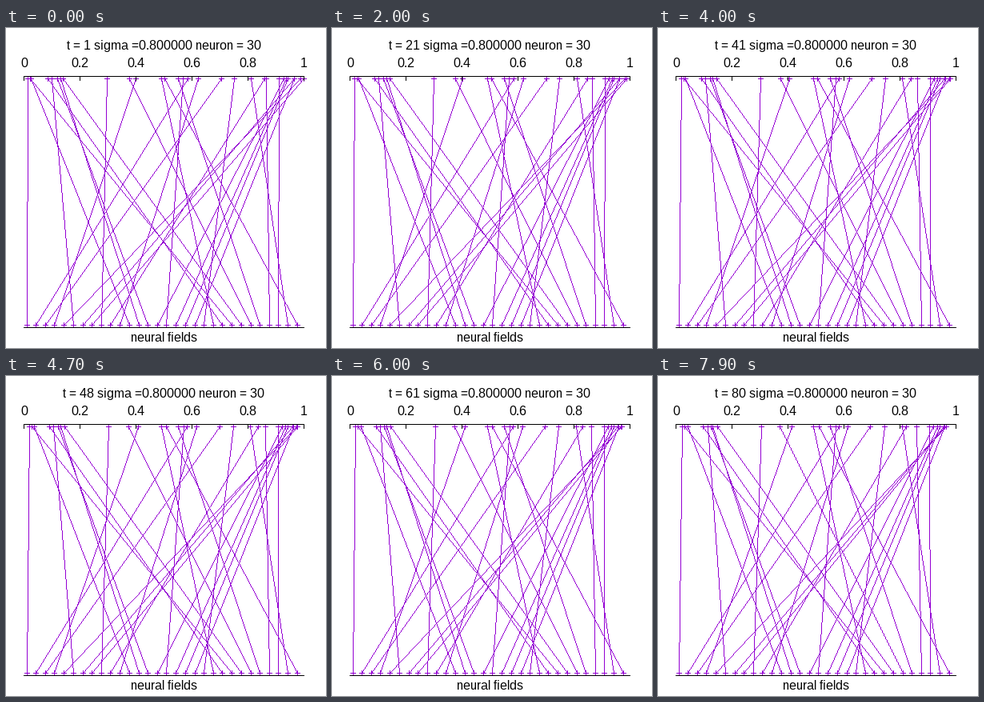
Recreate the animation shown at these times as a matplotlib script. Size 400 px wide and 400 px high, loop 8000 ms.

```python
import matplotlib.pyplot as plt
import numpy as np
from matplotlib.animation import FuncAnimation

SIZE, DPI = 400, 100
FRAMES, STEP = 80, 100
LEFT, RIGHT, TOP, BOTTOM = 22, 372, 60, 374
Y_IN, Y_OUT = 63, 371
VIOLET, BLACK = (148, 0, 211), (0, 0, 0)
N, SIGMA, RATE = 30, 0.8, 0.0132

# Random initial weights of the neurons, in pixels along the top axis
WEIGHTS = [27, 227, 269, 162, 368, 57, 360, 372, 126, 323,
           240, 31, 68, 64, 347, 221, 350, 352, 360, 285,
           194, 52, 30, 71, 154, 215, 325, 341, 306, 198]

plt.rcParams.update({"text.hinting": "default", "text.hinting_factor": 1})

index = np.arange(N)
bottoms = np.rint(LEFT + (0.01 + index / N) * (RIGHT - LEFT))
inputs = np.linspace(LEFT, RIGHT, 701)


def learn(w):
    """One mean step of a self-organising map over uniform inputs."""
    winner = np.abs(inputs[:, None] - w).argmin(axis=1)
    pull = np.exp(-((index - winner[:, None]) / SIGMA) ** 2 / 2)
    return w + RATE * (pull * (inputs[:, None] - w)).mean(axis=0)


history = [np.array(WEIGHTS, float)]
while len(history) < FRAMES:
    history.append(learn(history[-1]))


def line(img, x0, y0, x1, y1, color):
    n = int(max(abs(x1 - x0), abs(y1 - y0))) + 1
    xs = np.rint(np.linspace(x0, x1, n)).astype(int)
    ys = np.rint(np.linspace(y0, y1, n)).astype(int)
    img[ys, xs] = color


def cross(img, x, y):
    line(img, x - 3, y, x + 3, y, VIOLET)
    line(img, x, y - 3, x, y + 3, VIOLET)


def plot(tops):
    img = np.full((SIZE, SIZE, 3), 255, np.uint8)
    for a, b in zip(tops, bottoms):
        line(img, a, Y_IN, b, Y_OUT, VIOLET)
        cross(img, a, Y_IN)
        cross(img, b, Y_OUT)
    for y in (TOP, BOTTOM):
        line(img, LEFT, y, RIGHT, y, BLACK)
    for x in range(LEFT, RIGHT + 1, 70):
        line(img, x, TOP, x, TOP + 5, BLACK)
    return img


def label(x, y, text):
    return ax.text(x, y, text, ha="center", va="baseline", color="black",
                   family="Liberation Sans", size=16 * 72 / DPI)


fig = plt.figure(figsize=(SIZE / DPI, SIZE / DPI), dpi=DPI, facecolor="white")
ax = fig.add_axes([0, 0, 1, 1])
ax.axis("off")
picture = ax.imshow(plot(history[0]), extent=(0, SIZE, SIZE, 0),
                    interpolation="nearest", aspect="auto")
for k in range(6):
    label(LEFT + 70 * k + 0.5, 49, f"{k / 5:g}")
label(197, 392, "neural fields")
title = label(197, 27, "")


def draw(i):
    picture.set_data(plot(np.rint(history[i])))
    title.set_text(f"t = {i + 1} sigma ={SIGMA:.6f} neuron = {N}")
    return picture, title


anim = FuncAnimation(fig, draw, frames=FRAMES, interval=STEP,
                     repeat=True, repeat_delay=0)
plt.show()
```
